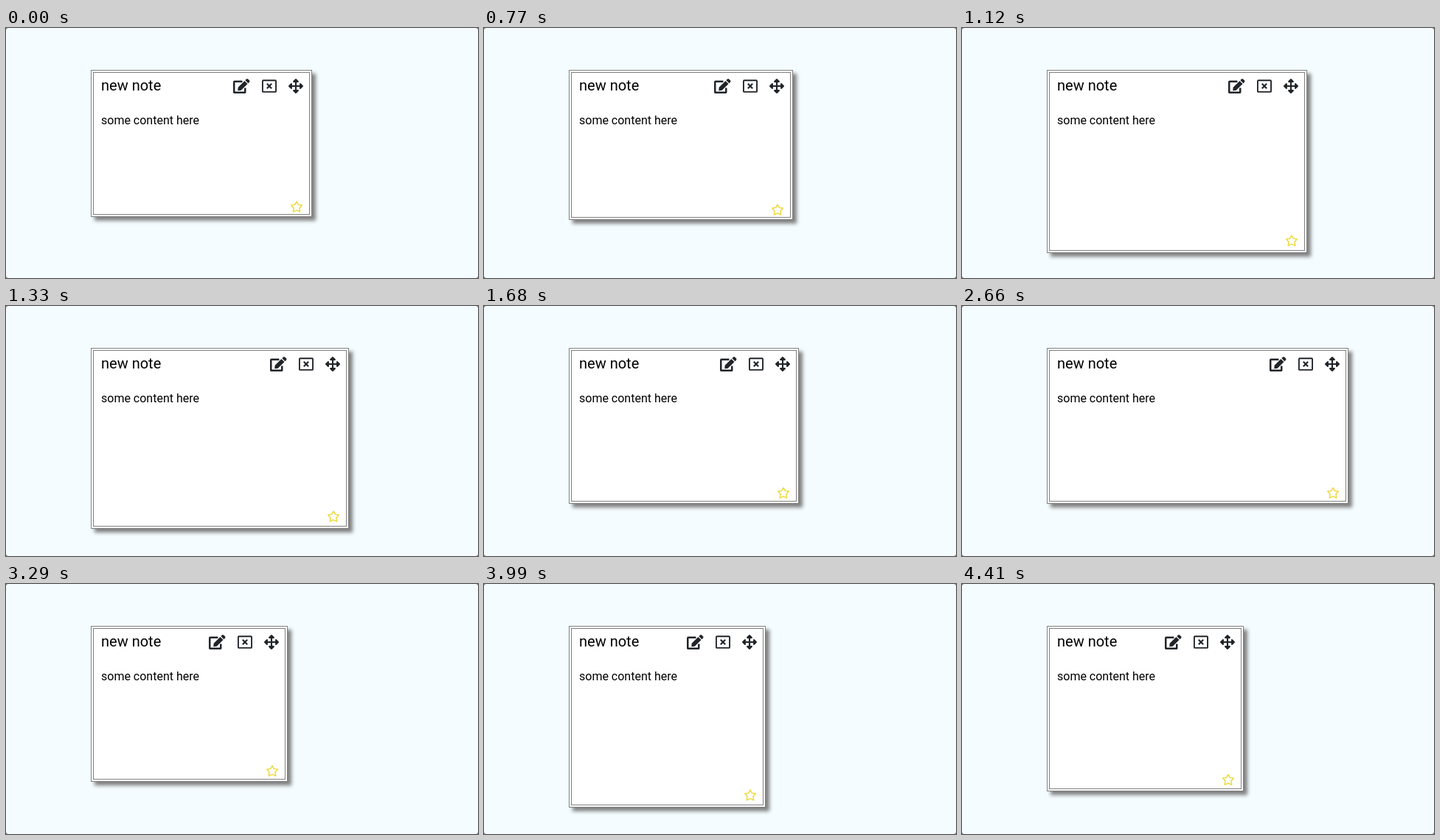
Animation of 640 by 340 pixels, one loop 4760 ms. Source, as an HTML page:

```html
<!DOCTYPE html>
<html lang="en">
<head>
<meta charset="utf-8">
<title>Resizable note</title>
<style>
  html { background: #555; }
  html, body { margin: 0; width: 100%; height: 100%; overflow: hidden; }
  body { position: relative; background: #f4fcff; border-radius: 3px; }
  #note {
    position: absolute; left: 115px; top: 57px; box-sizing: border-box;
    background: #fff; border: 4px double gray; box-shadow: 5px 5px 5px gray;
    color: #000; font-family: Roboto, sans-serif;
  }
  #note > * { position: absolute; white-space: nowrap; }
  .title { left: 10px; top: 5px; font-size: 20px; line-height: 24px; }
  .text { left: 10px; top: 55px; font-size: 16px; line-height: 19px; }
  svg { right: 8px; overflow: visible; }
  .tools { top: 7.5px; width: 95px; height: 20px; fill: #212529; }
  .line { fill: none; stroke: #212529; }
  .star { top: calc(93% - 4.5px); width: 18px; height: 16px; fill: none; stroke: #ecd93c; }
</style>
</head>
<body>
<div id="note">
  <div class="title">new note</div>
  <div class="text">some content here</div>
  <svg class="tools" viewBox="0 0 2432 512">
    <path class="line" stroke-width="64" d="M318 96H48a16 16 0 0 0-16 16v352a16 16 0 0 0 16 16h352a16 16 0 0 0 16-16V320"/>
    <path d="M395 76L500 180 274 406 160 417 170 302ZM418 54l42-42q28-24 56 0l49 48q22 28 0 56l-42 42z"/>
    <g class="line" transform="translate(998)">
      <rect x="24" y="56" width="464" height="400" rx="24" stroke-width="48"/>
      <path stroke-width="56" d="M175 175L337 337M337 175L175 337"/>
    </g>
    <g transform="translate(1920)">
      <path id="arm" d="M228 284V127H177q-36-6-17-41L239 7q17-14 34 0l79 79q19 35-17 41H284V284z"/>
      <use href="#arm" transform="rotate(90 256 256)"/>
      <use href="#arm" transform="rotate(180 256 256)"/>
      <use href="#arm" transform="rotate(270 256 256)"/>
    </g>
  </svg>
  <svg class="star" viewBox="0 0 576 512">
    <polygon stroke-width="48" stroke-linejoin="round"
      points="288 40 366 172 520 194 414 320 440 482 288 412 136 482 162 320 56 194 210 172"/>
  </svg>
</div>
<script>
  const LOOP = 4760, STEP = 70;
  const note = document.getElementById('note');

  // Each drag: start and end time, then the width and height it reaches.
  const drags = [
    [700, 1120, 353, 249],
    [1260, 1680, 312, 212],
    [2240, 2660, 409, 212],
    [2730, 3010, 267, 212],
    [3780, 4130, 267, 266],
    [4200, 4410, 267, 225],
  ];

  const ease = p => p * p * (3 - 2 * p);

  function sizeAt(time) {
    let width = 300, height = 200;
    for (const [start, end, toWidth, toHeight] of drags) {
      if (time <= start) break;
      const k = ease(Math.min(1, (time - start) / (end - start)));
      width += (toWidth - width) * k;
      height += (toHeight - height) * k;
    }
    return [Math.round(width), Math.round(height)];
  }

  function draw() {
    const time = performance.now() % LOOP;
    const [width, height] = sizeAt(Math.floor(time / STEP) * STEP);
    note.style.width = width + 'px';
    note.style.height = height + 'px';
    requestAnimationFrame(draw);
  }
  draw();
</script>
</body>
</html>
```
